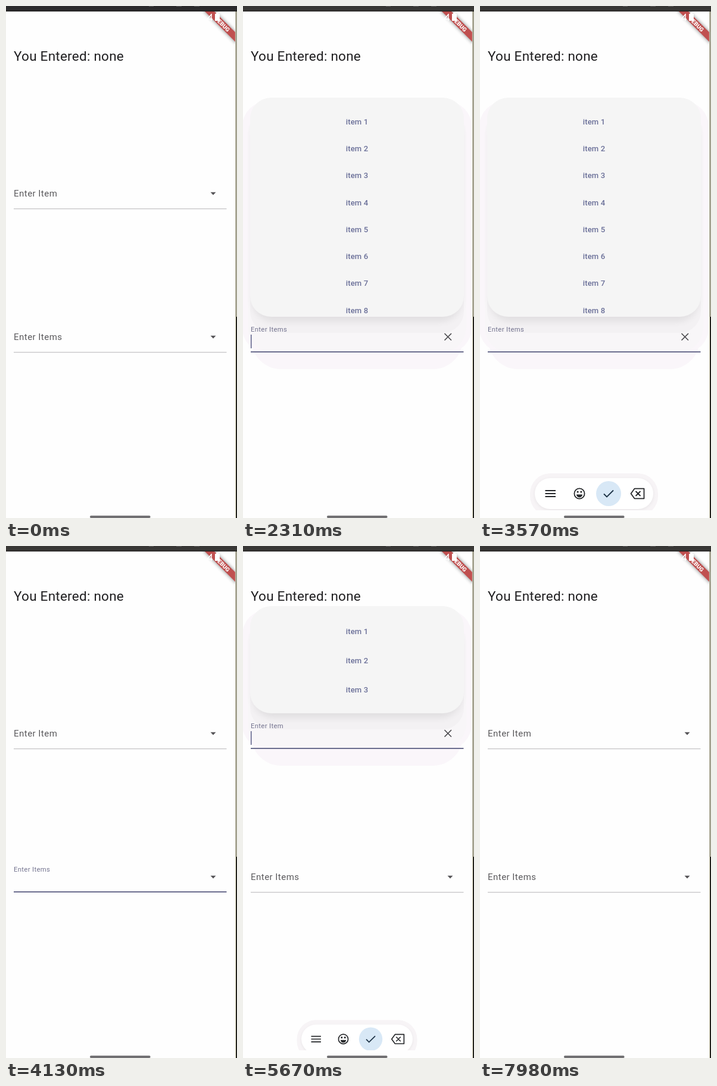
These frames come from a looping animation (388x860 px, 8 s). An HTML page:

```html
<!DOCTYPE html>
<html lang="en">
<head>
<meta charset="utf-8">
<title>Dropdown fields</title>
<style>
  html, body { margin: 0; width: 100%; height: 100%; overflow: hidden; background: #fefefe; }
  svg { display: block; width: 100%; height: 100%; font-family: Roboto, sans-serif; }
  .title { font-size: 22.5px; letter-spacing: .25px; fill: #1f1e20; }
  .label { font-size: 15px; letter-spacing: .47px; }
  .item { font-size: 13.1px; font-weight: 500; letter-spacing: .09px; fill: #6b7099; text-anchor: middle; }
  .debug { font-size: 9.6px; font-weight: 900; fill: #fff; text-anchor: middle; }
  .icon { fill: none; stroke: #26282b; stroke-width: 1.8; }
</style>
</head>
<body>
<svg viewBox="0 0 388 860" preserveAspectRatio="none">
  <defs>
    <filter id="soft" x="-20%" y="-30%" width="140%" height="160%"><feGaussianBlur stdDeviation="6"/></filter>
    <filter id="near" x="-20%" y="-60%" width="140%" height="220%"><feGaussianBlur stdDeviation="3"/></filter>
    <clipPath id="corner"><path d="M300 9h86v70h-86z"/></clipPath>
    <clipPath id="keys"><path d="M0 0h388v847H0z"/></clipPath>
  </defs>
  <rect width="388" height="860" fill="#fefefe"/>

  <g id="fields"></g>
  <text class="title" x="13" y="92">You Entered: none</text>

  <g clip-path="url(#corner)">
    <g transform="translate(386 8) rotate(45)">
      <rect x="-40" y="26.2" width="80" height="11.3" opacity=".5" filter="url(#near)"/>
      <rect x="-40" y="26.2" width="80" height="11.3" fill="#c05050"/>
      <text class="debug" y="35.3">DEBUG</text>
    </g>
    <path d="M345 13v12M345 14l-7 8h9" fill="none" stroke="#fff" stroke-width="1.5"/>
    <path d="M353 11h4v2h2v12h-8v-12h2z" fill="#fff"/>
  </g>

  <g clip-path="url(#keys)">
    <g id="toolbar">
      <rect x="-107.5" y="-34" width="215" height="72" rx="34" fill="#f7f4f6"/>
      <rect x="-99" y="-24" width="198" height="51" rx="25.5" opacity=".07" filter="url(#near)"/>
      <rect x="-99.5" y="-26" width="199" height="52" rx="26" fill="#fff"/>
      <circle cx="24.5" r="21" fill="#d8e8f6"/>
      <g class="icon">
        <path d="M-82 -5h17.500M-82 0h17.500M-82 5h17.500"/>
        <circle cx="-24.500" r="8.600"/>
        <path d="M-29.500 1.500a5 5 0 0 0 10 0z" fill="#26282b" stroke="none"/>
        <path d="M-28.800 -2.800h2.800M-23 -2.800h2.800" stroke-width="2.800"/>
        <path d="M16.500 .5l5 5 11 -11" stroke="#1c3145"/>
        <path d="M68 -8.300h16v16.600h-16l-6 -8.300zM70 -4l8 8M78 -4l-8 8" stroke-linejoin="round"/>
      </g>
    </g>
  </g>

  <rect x="141" y="856" width="101.500" height="4" rx="1.800" fill="#727173"/>
  <path d="M385 9h3v851h-3z" fill="#e9e7cf"/>
  <path d="M386 9h1v851h-1z" fill="#4a483f"/>
  <path d="M387 522h1v338h-1z" fill="#050505"/>
  <rect id="bar" width="388" height="9"/>
  <path d="M240 0h8M286 0h9M316 0h9" stroke="#8a8a8a"/>
  <path d="M0 8.700h388" stroke="#111"/>
</svg>
<script>
const LOOP = 8000;
const $ = id => document.getElementById(id);
const show = (el, on) => el.setAttribute('display', on ? 'inline' : 'none');
const progress = (t, start, length) => Math.min(1, Math.max(0, (t - start) / length));
const within = (t, [a, b]) => t >= a && t < b;

// Times in ms: focus on tap, open with the popup, keys with the toolbar, close on dismissal.
const fields = [
  { label: 'Enter Item', y: 315, line: 340.7, focus: 5390, open: 5460, keys: 5460, close: 7490,
    blinks: [[5460, 5880], [6370, 6930], [7420, 7490]],
    popup: { top: 101, bottom: 281, first: 143, step: 49.2, count: 3 } },
  { label: 'Enter Items', y: 556, line: 581.7, focus: 2100, open: 2310, keys: 2590, close: 3990,
    blinks: [[2310, 2590], [3080, 3570]],
    popup: { top: 154, bottom: 522, first: 194, step: 45.25, count: 8 } }
];

function popupMarkup({ top, bottom, first, step, count }) {
  const panel = (x, y, end, r, style) =>
    `<rect x="${x}" y="${y}" width="${383 - 2 * x}" height="${end - y}" rx="${r}" ${style}/>`;
  const items = Array.from({ length: count }, (_, i) =>
    `<text class="item" x="191.500" y="${first + i * step + 4.8}">item ${i + 1}</text>`);
  return panel(14, top + 30, bottom + 88, 50, 'fill="#faf6fa"')
    + panel(-1, top + 6, bottom + 61, 42, 'fill="#faf6fa"')
    + panel(8, top + 20, bottom + 60, 42, 'fill="#f8f6f8"')
    + panel(12, top + 20, bottom + 27, 36, 'fill="#f3f1f3"')
    + panel(16, top + 24, bottom + 8, 36, 'opacity=".07" filter="url(#soft)"')
    + panel(12, top, bottom, 35, 'fill="#f5f5f5"')
    + items.join('');
}

function addGroup(markup) {
  const g = document.createElementNS('http://www.w3.org/2000/svg', 'g');
  g.innerHTML = markup;
  return $('fields').appendChild(g);
}

for (const f of fields) {
  f.popupEl = addGroup(popupMarkup(f.popup));
  const g = addGroup(`
    <text class="label">${f.label}</text>
    <path/>
    <path d="M343.500 ${f.y - 2.3}h9l-4.500 4.800z" fill="#555457"/>
    <path d="M338.500 ${f.y - 6}l11.500 11.500m0 -11.500l-11.500 11.500" stroke="#47464a" stroke-width="1.600"/>
    <path d="M13.700 ${f.y - 4}v23" stroke="#61648c" stroke-width="1.600"/>`);
  [f.text, f.underline, f.arrow, f.clear, f.cursor] = g.children;
}

function drawField(f, t) {
  const open = within(t, [f.open, f.close]);
  const active = within(t, [f.focus, f.close + 200]);
  const float = t < f.open ? 0 : 1 - progress(t, f.close + 140, 140);
  const size = 1 - .25 * float;
  f.text.setAttribute('transform', `translate(13 ${f.y + 5 - 14.2 * float}) scale(${size})`);
  f.text.setAttribute('fill', active ? '#73738f' : '#5a595c');
  f.underline.setAttribute('d', `M13 ${active ? f.line - .7 : f.line}h357.500`);
  f.underline.setAttribute('stroke', active ? '#6b6d8e' : '#c4c3c5');
  f.underline.setAttribute('stroke-width', active ? 1.8 : 1.3);
  show(f.popupEl, open);
  show(f.clear, open);
  show(f.arrow, !open);
  show(f.cursor, f.blinks.some(span => within(t, span)));
}

function drawToolbar(t) {
  const f = fields.find(f => within(t, [f.keys, f.close + 130]));
  show($('toolbar'), f);
  if (!f) return;
  const rest = (1 - progress(t, f.keys, 490)) ** 3 + progress(t, f.close, 130);
  $('toolbar').setAttribute('transform', `translate(191.500 ${819 + 50 * rest}) scale(${1 - .33 * rest})`);
}

function frame(now) {
  const t = now % LOOP;
  fields.forEach(f => drawField(f, t));
  drawToolbar(t);
  $('bar').setAttribute('fill', t < 910 ? '#2b2a2b' : '#383735');
  requestAnimationFrame(frame);
}
frame(0);
</script>
</body>
</html>
```
